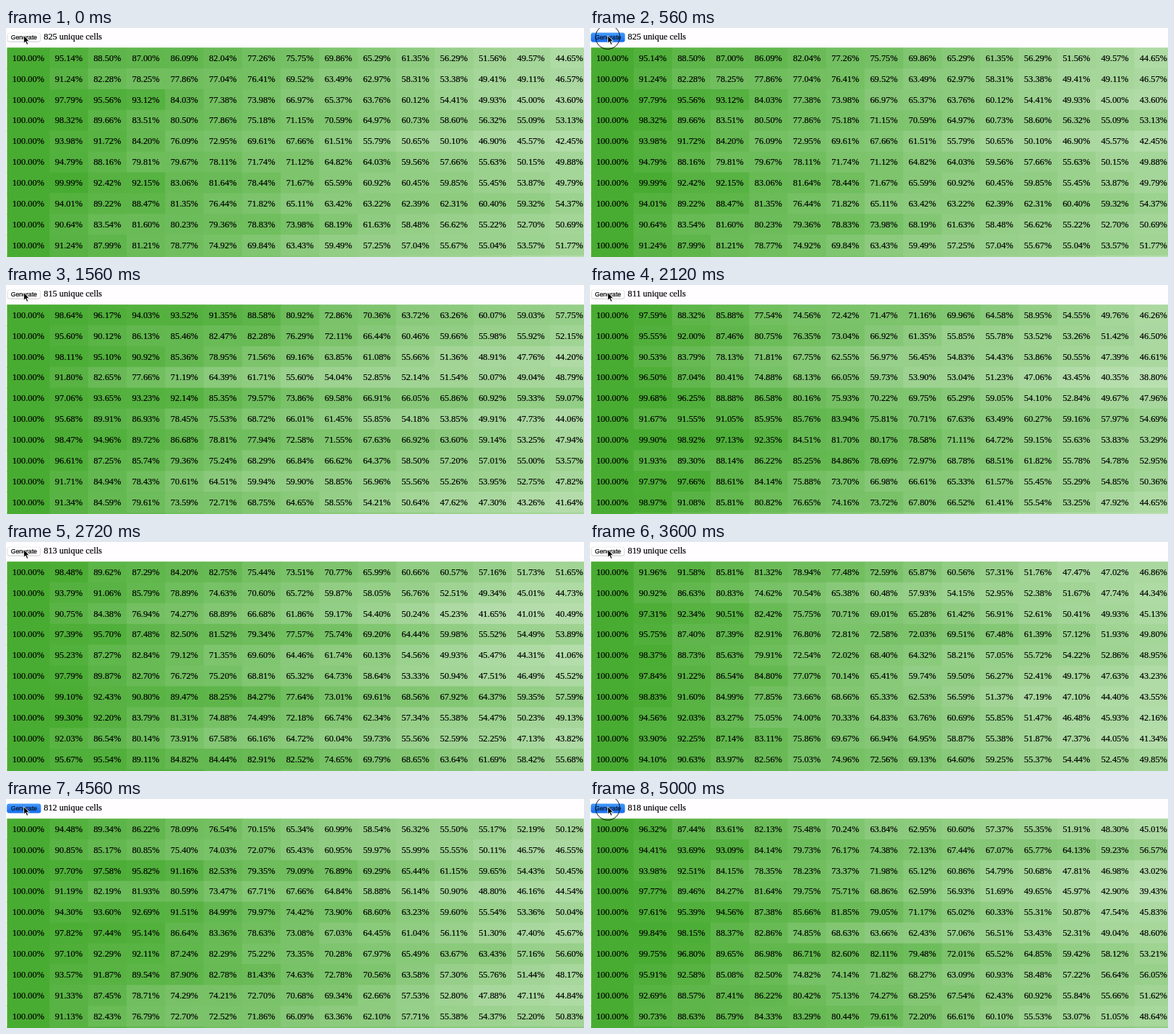
Animation of 800 by 318 pixels, one loop 5040 ms. Source, as an HTML page:

```html
<!DOCTYPE html>
<html lang="en">
<head>
<meta charset="utf-8">
<title>Generated cells</title>
<style>
  html, body { margin: 0; width: 100%; height: 100%; overflow: hidden; background: #fffdff; }
  svg { display: block; width: 800px; height: 318px; }
  text { font: 12.4px "Liberation Serif", Times, serif; stroke: currentColor; stroke-width: .2; }
  .count { font-size: 12.3px; }
  .label { font: 8.7px "Liberation Sans", Arial, sans-serif; }
  .cells text { text-anchor: middle; }
  .table, .down, .ring { visibility: hidden; }
  .on { visibility: visible; }
</style>
</head>
<body>
<svg viewBox="0 0 800 318">
  <defs>
    <linearGradient id="blue" x2="0" y2="1">
      <stop stop-color="#459af9"/>
      <stop offset="1" stop-color="#126df4"/>
    </linearGradient>
  </defs>
  <g id="tables"></g>
  <g>
    <rect x="1.8" y="7.2" width="46" height="12.2" rx="3" fill="#c4c2c4"/>
    <rect x="2.2" y="7" width="45.2" height="11.8" rx="2.8" fill="#fff" stroke="#dddbdd" stroke-width=".5"/>
    <text class="label" x="6.7" y="16.1">Generate</text>
  </g>
  <g class="down">
    <rect x="1.2" y="6.4" width="47.2" height="13" rx="3" fill="url(#blue)"/>
    <text class="label" x="6.7" y="16.1" fill="#08183c">Generate</text>
  </g>
  <circle class="ring" cx="24.5" cy="12.5" r="16.8" fill="none" stroke="#111"/>
  <path d="M24.6 10.6v10.6l2.4-2.3 1.8 4.3 1.9-.8-1.8-4.2h3.3z" stroke="#fff" stroke-width=".8"/>
</svg>
<script>
const LOOP = 5040;
const ROWS = 11, COLS = 15, MAX_DROP = 0.1;
const LEFT = 1.4, SECOND = 60.3, PITCH = 53.3, TOP = 27.2, ROW = 28.87;
const COUNTS = [825, 815, 811, 813, 819, 812, 818];
const PRESSES = [560, 1700, 2280, 3020, 4200, 4740];
const REDRAW = 200, RING = 340, BLUE = 400; // delays after each press

function randomizer(seed) {
  return () => {
    seed = (seed + 0x6d2b79f5) | 0;
    let n = Math.imul(seed ^ (seed >>> 15), seed | 1);
    n ^= n + Math.imul(n ^ (n >>> 7), n | 61);
    return ((n ^ (n >>> 14)) >>> 0) / 4294967296;
  };
}

function shade(value) {
  const mix = c => Math.round(255 - (255 - c) * value / 100);
  return `rgb(${mix(73)},${mix(172)},${mix(50)})`;
}

// Each cell runs 1px under its neighbours so no seam shows
function cell(value, col, row) {
  const x = col ? SECOND + (col - 1) * PITCH : LEFT;
  const width = col ? PITCH : SECOND - LEFT;
  const y = TOP + row * ROW;
  return `<rect x="${x}" y="${y}" width="${width + 1}" height="${ROW + 1}" fill="${shade(value)}"/>` +
    `<text x="${x + width / 2}" y="${y + 18.6}">${value.toFixed(2)}%</text>`;
}

// Every row starts at 100% and loses up to a tenth per column
function tableMarkup(count) {
  const random = randomizer(count);
  let cells = "";
  for (let row = 0; row < ROWS; row++) {
    let value = 100;
    for (let col = 0; col < COLS; col++) {
      cells += cell(value, col, row);
      value *= 1 - random() * MAX_DROP;
    }
  }
  return `<g class="table"><text class="count" x="52.3" y="16.4">${count} unique cells</text>` +
    `<g class="cells">${cells}</g></g>`;
}

document.getElementById("tables").innerHTML = COUNTS.map(tableMarkup).join("");
const tables = document.querySelectorAll(".table");
const down = document.querySelector(".down");
const ring = document.querySelector(".ring");
const show = (el, on) => el.classList.toggle("on", on);
const start = performance.now();

function draw() {
  const t = (performance.now() - start) % LOOP;
  const current = PRESSES.filter(p => t >= p + REDRAW).length;
  const held = span => PRESSES.some(p => t >= p && t < p + span);
  tables.forEach((el, i) => show(el, i === current));
  show(down, held(BLUE));
  show(ring, held(RING));
  requestAnimationFrame(draw);
}
draw();
</script>
</body>
</html>
```
